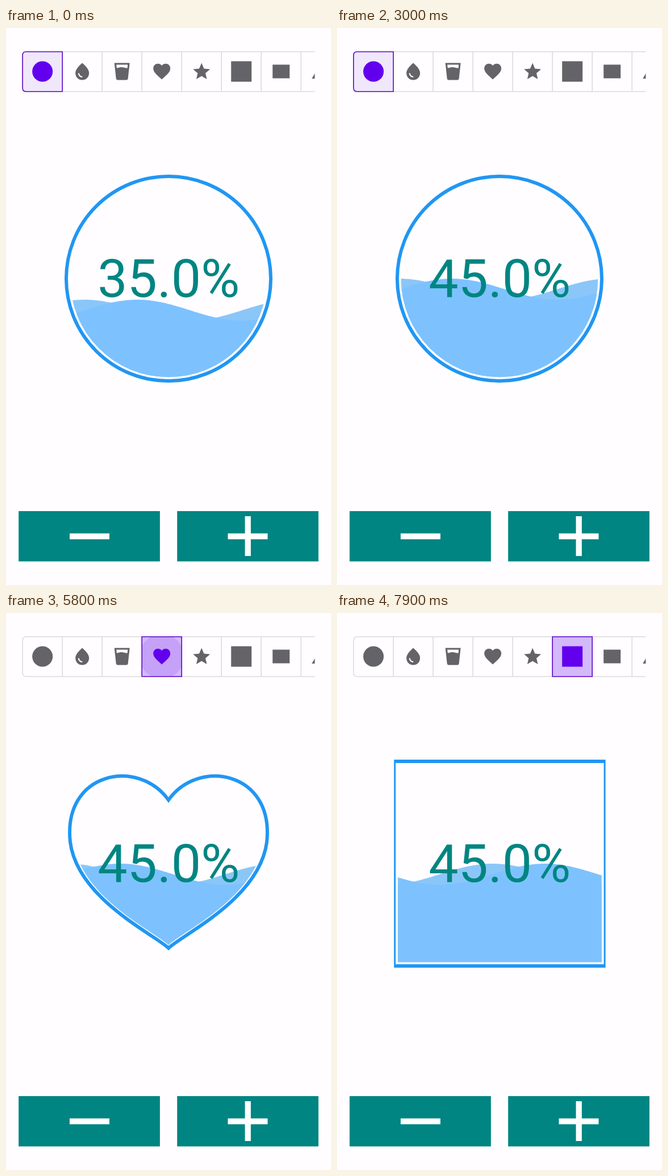
These frames come from a looping animation (572 px wide and 980 px high, 8000 ms). An HTML page:

```html
<!DOCTYPE html>
<html lang="en">
<head>
<meta charset="utf-8">
<title>Wave progress</title>
<style>
html, body { margin: 0; width: 100%; height: 100%; overflow: hidden; background: #fffdff; }
svg { display: block; width: 572px; height: 980px; }
text { font: 93.3px Roboto, sans-serif; fill: #008582; text-anchor: middle; }
</style>
</head>
<body>
<svg viewBox="0 0 572 980">
  <defs>
    <clipPath id="view"><rect x="100.3" y="250" width="372.3" height="390"/></clipPath>
    <clipPath id="strip"><rect x="20" y="36" width="523.5" height="80"/></clipPath>
    <clipPath id="cell"><path class="selected"/></clipPath>
    <clipPath id="inside"><path id="mask"/></clipPath>
  </defs>
  <g clip-path="url(#strip)">
    <rect x="29.2" y="41.7" width="600" height="70" rx="6" fill="none" stroke="#dcdae0" stroke-width="1.6"/>
    <path id="dividers" stroke="#dcdae0" stroke-width="1.6"/>
    <path class="selected" fill="#f0e7fb"/>
    <g clip-path="url(#cell)" fill="#6200ee">
      <path class="selected" id="press"/>
      <circle id="ripple" cy="76.5"/>
    </g>
    <path class="selected" fill="none" stroke="#5b08c8" stroke-width="1.6"/>
    <g id="icons" fill-rule="evenodd"></g>
  </g>
  <path id="outline" clip-path="url(#view)" fill="none" stroke="#2196f3" stroke-width="6"/>
  <g clip-path="url(#inside)">
    <path id="back" fill="#8bc6f9"/>
    <path id="front" fill="#7dc2fe"/>
  </g>
  <text id="label" x="286.3" y="473"></text>
  <path d="M22.2 850h248.700v88.600H22.200zM301.200 850h248.700v88.600H301.200z" fill="#008582"/>
  <path d="M112 894.300h70M390.500 894.300h70M425.700 859v70" stroke="#fff" stroke-width="10.3"/>
</svg>
<script>
const $ = id => document.getElementById(id);
const set = (el, attrs) => { for (const k in attrs) el.setAttribute(k, attrs[k]); };
const clamp = (v, lo = 0, hi = 1) => Math.min(hi, Math.max(lo, v));

const CELL = 70, LEFT = 29.2;         // tab strip
const FIRST = 2950, STEP = 900;       // shape changes, ms
const LENGTH = 370, HEIGHT = 18.5;    // wave

const circle = (x, y, r) => `M${x - r} ${y}a${r} ${r} 0 1 0 ${2 * r} 0a${r} ${r} 0 1 0 ${-2 * r} 0z`;
const box = (x, y, w, h) => `M${x} ${y}h${w}v${h}h${-w}z`;

function star(x, y, r) {
  const points = Array.from({ length: 10 }, (_, i) => {
    const a = i * Math.PI / 5, k = i % 2 ? r * 0.456 : r;
    return [x + k * Math.sin(a), y - k * Math.cos(a)];
  });
  return 'M' + points.join('L') + 'z';
}

// Icons on a 24-unit grid, drawn at 36px
const icons = [
  circle(12, 12, 12),
  'M12 2C6.700 6.500 4 10.500 4 13.800C4 18.800 7.800 22 12 22S20 18.800 20 13.800C20 10.500 17.300 6.500 12 2zM7 14a5 5 0 0 0 5 5v-1.500a3.500 3.500 0 0 1-3.500-3.500z',
  'M3 2L5 20.200Q5.200 22 7 22H17Q18.800 22 19 20.200L21 2zM5.300 4h13.400l-.400 4c-2.200 .400-4-1-6.600-1c-2.300 0-3.600 .400-5.900 1z',
  'M12 21.350C5.400 15.400 2 12.300 2 8.500C2 3 8.500 .900 12 5.100C15.500 .900 22 3 22 8.500C22 12.300 18.600 15.400 12 21.350z',
  star(12, 12.5, 10.5),
  box(0, 0, 24, 24),
  box(2, 4, 20, 16),
  'M1.300 20.400L12 2.400L22.700 20.400z'
];

// Vessel outlines, each with the point its water mask shrinks towards
const vessels = [
  [circle(286, 441, 180), 286, 441],
  ['M279 258C200 297 147 380 147 467C147 550 200 609 279 609S411 550 411 467C411 380 358 297 279 258z', 279, 467],
  ['M136 258H422L386.500 609H171.500z', 279, 474],
  ['M286 329C233 254.500 99.700 279 113 403C126 502.500 259.600 564.500 286 589.500C312.400 564.500 446 502.500 459 403C472.300 279 339 254.500 286 329z', 286, 440],
  [star(286, 450, 185), 286, 450],
  [box(100.3, 261, 372.3, 360), 286.4, 437]
];

// Crest of the front wave over time, with slight changes of speed
const crests = [[0, 231], [3900, 1156], [6400, 1847], [8000, 2241]];

function crestAt(t) {
  const i = crests.findIndex(k => k[0] > t);
  const [t0, a] = crests[i - 1], [t1, b] = crests[i];
  return a + (b - a) * (t - t0) / (t1 - t0);
}

function wave(crest, mid) {
  let d = 'M95 650';
  for (let x = 95; x <= 477; x += 3)
    d += `L${x} ${mid - HEIGHT * Math.cos((x - crest) * 2 * Math.PI / LENGTH)}`;
  return d + 'V650z';
}

set($('dividers'), { d: icons.map((_, i) => i ? `M${LEFT + CELL * i} 41.700v70` : '').join('') });
const iconEls = icons.map((d, i) => {
  const el = document.createElementNS('http://www.w3.org/2000/svg', 'path');
  set(el, { d, transform: `translate(${LEFT + 17 + CELL * i} 58.5) scale(1.5)` });
  return $('icons').appendChild(el);
});

function draw(now) {
  const t = Math.floor(now % 8000 / 100) * 100;
  const n = Math.max(0, Math.floor((t - FIRST) / STEP));
  const age = n ? (t - FIRST) % STEP : STEP;

  // Five presses of plus, then three of minus
  const ups = clamp(Math.floor(t / 220), 0, 5);
  const downs = clamp(Math.floor((t - 1900) / 300), 0, 3);
  const percent = 35 + 5 * (ups - downs);

  // Tab strip
  const x = LEFT + CELL * n, r = n ? 0 : 6;
  const d = `M${x + CELL} 41.700H${x + r}q${-r} 0 ${-r} ${r}V${111.7 - r}q0 ${r} ${r} ${r}H${x + CELL}z`;
  document.querySelectorAll('.selected').forEach(el => set(el, { d }));
  iconEls.forEach((el, i) => set(el, { fill: i === n ? '#6200ee' : '#646367' }));
  set($('press'), { opacity: 0.2 * clamp((650 - age) / 150) });
  set($('ripple'), { cx: x + CELL / 2, r: 28 + age * 0.075, opacity: 0.13 * clamp((450 - age) / 100) });

  // Vessel and water
  const [outline, cx, cy] = vessels[n];
  set($('outline'), { d: outline });
  set($('mask'), { d: outline, transform: `translate(${cx} ${cy}) scale(.963) translate(${-cx} ${-cy})` });
  const mid = 626 - 3.7 * percent, crest = crestAt(t);
  set($('back'), { d: wave(crest - LENGTH / 4, mid) });
  set($('front'), { d: wave(crest, mid) });
  $('label').textContent = percent.toFixed(1) + '%';
}

const start = performance.now();
(function loop() {
  draw(performance.now() - start);
  requestAnimationFrame(loop);
})();
</script>
</body>
</html>
```
